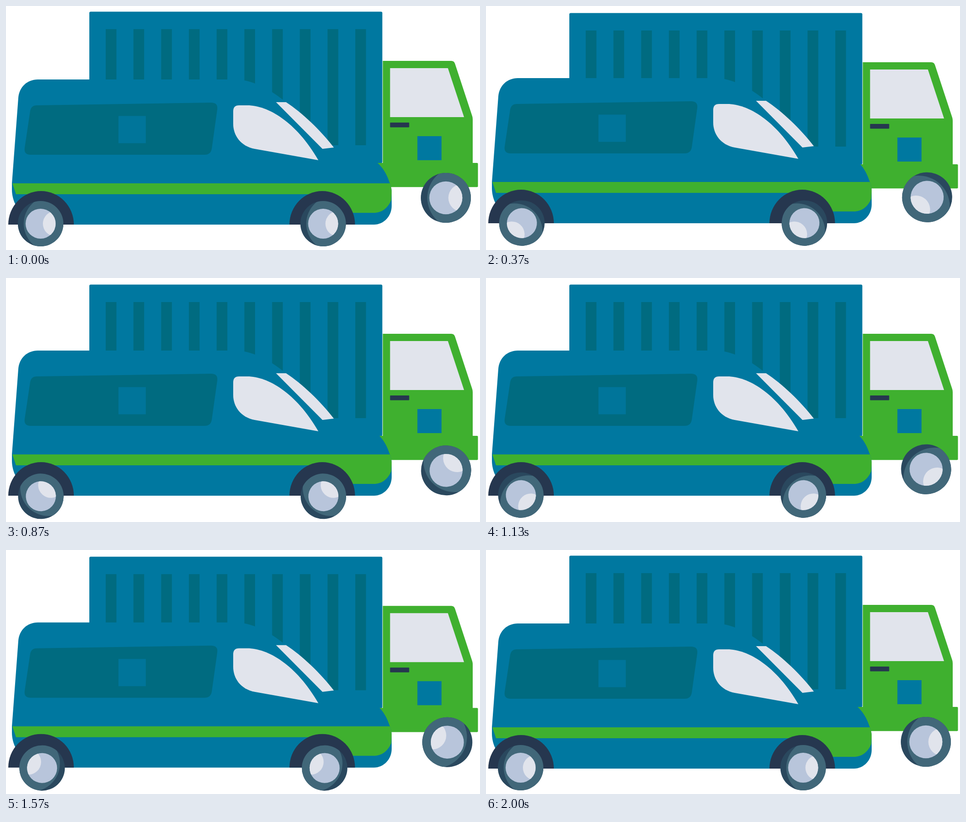
These frames come from a looping animation (1041 by 538 pixels, 2030 ms). An HTML page with a canvas:

```html
<!DOCTYPE html>
<html lang="en">
<head>
<meta charset="utf-8">
<title>Delivery van and truck</title>
<style>
  html, body { margin: 0; width: 100%; height: 100%; overflow: hidden; background: #fff; }
  canvas { display: block; width: 1041px; height: 538px; }
</style>
</head>
<body>
<canvas id="stage" width="1041" height="538"></canvas>
<script>
const ctx = document.getElementById('stage').getContext('2d');

const BLUE = '#0078a0', TEAL = '#006b80', GREEN = '#3fb02f', GLASS = '#e1e4ec';
const NAVY = '#26374f', TYRE_DARK = '#2a485e', TYRE = '#416779', HUB = '#b8c5db';

const LOOP = 2030;      // ms
const FPS = 30;
const TURN_STEPS = 30;  // steps per wheel turn
const BOB_STEPS = 20;   // steps per up-and-down cycle
const BOB = 3.3;

const shape = d => new Path2D(d);
const van = {
  body: shape(`M70 162 H500 C540 162 575 180 615 212 C650 235 690 273 720 312
    C770 322 823 325 843 391 C846 398 847 405 847 412 V441 C847 463 830 482 808 482
    H60 L20 436 C17 430 13 418 13 405 V391 L27 203 C29 178 47 162 70 162 Z`),
  stripe: shape(`M14 391 H843 C846 398 847 405 847 412 L846 428
    C838 447 824 456 808 456 H690 V415 H22 Z`),
  panel: shape(`M68 219 L450 213 Q466 213 464 228 L452 314 Q450 328 436 328
    H54 Q39 328 41 313 L53 232 Q55 219 68 219 Z`),
  sideWindow: shape(`M512 219 H530 C575 219 637 255 686 340 L546 315
    C515 309 499 285 499 260 V232 Q499 219 512 219 Z`),
  windshield: shape('M593 212 H615 C650 235 690 273 720 312 L695 315 Z'),
};
const truck = {
  cab: shape('M827.5 121 H978 Q984 121 986 127 L1024 243 Q1025 246 1025 250 V347 H827.5 Z'),
  window: shape('M843.5 137 H970.5 L1006 245 H843.5 Z'),
};

function fill(path, color) {
  ctx.fillStyle = color;
  ctx.fill(path);
}

function box(x, y, w, h, color, r = 0) {
  const path = new Path2D();
  path.roundRect(x, y, w, h, r);
  fill(path, color);
}

function disc(x, y, r, color) {
  const path = new Path2D();
  path.arc(x, y, r, 0, 2 * Math.PI);
  fill(path, color);
  return path;
}

// A disc with a second, offset disc showing only inside it.
function litDisc(r, color, x, litR, litColor) {
  ctx.save();
  ctx.clip(disc(0, 0, r, color));
  disc(x, 0, litR, litColor);
  ctx.restore();
}

// The wheel turns about a point slightly off its centre.
function wheel(x, y, r, angle) {
  ctx.save();
  ctx.translate(x, y);
  ctx.rotate(angle);
  ctx.translate(-1.7, 0);
  ctx.scale(r / 50, r / 50);
  litDisc(50, TYRE_DARK, 25, 62, TYRE);
  litDisc(33, HUB, 33, 28, GLASS);
  ctx.restore();
}

function arch(x) {
  const path = new Path2D();
  path.ellipse(x, 482, 72, 74, 0, Math.PI, 2 * Math.PI);
  fill(path, NAVY);
}

function shifted(dy, paint) {
  ctx.save();
  ctx.translate(0, dy);
  paint();
  ctx.restore();
}

function paintTruck() {
  box(183, 12.5, 643.5, 334, BLUE, 3);
  for (let i = 0; i < 10; i++) box(219 + 60.9 * i, 51, 23.5, 256, TEAL);
  fill(truck.cab, GREEN);
  box(780, 346, 256.5, 53.3, GREEN, 2);
  fill(truck.window, GLASS);
  box(843.5, 257, 42, 10.5, NAVY, 1);
  box(903.5, 287, 53, 53, BLUE);
}

function paintVan() {
  fill(van.body, BLUE);
  fill(van.stripe, GREEN);
  fill(van.panel, TEAL);
  box(247, 242.5, 60, 60, '#00759a');
  fill(van.sideWindow, GLASS);
  fill(van.windshield, GLASS);
  arch(77);
  arch(694.5);
}

function draw(now) {
  const step = Math.floor((now % LOOP) * FPS / 1000 + 0.12);
  const angle = step / TURN_STEPS * 2 * Math.PI;
  const phase = step % BOB_STEPS / BOB_STEPS;
  const bob = BOB * (1 - Math.abs(1 - 2 * phase));

  ctx.fillStyle = '#fff';
  ctx.fillRect(0, 0, 1041, 538);
  shifted(bob, paintTruck);
  wheel(967.7, 423, 55, angle);
  shifted(-bob, paintVan);
  wheel(77.7, 480, 50, angle);
  wheel(698.2, 480, 50, angle);
}

function tick() {
  draw(performance.now());
  requestAnimationFrame(tick);
}
tick();
</script>
</body>
</html>
```
